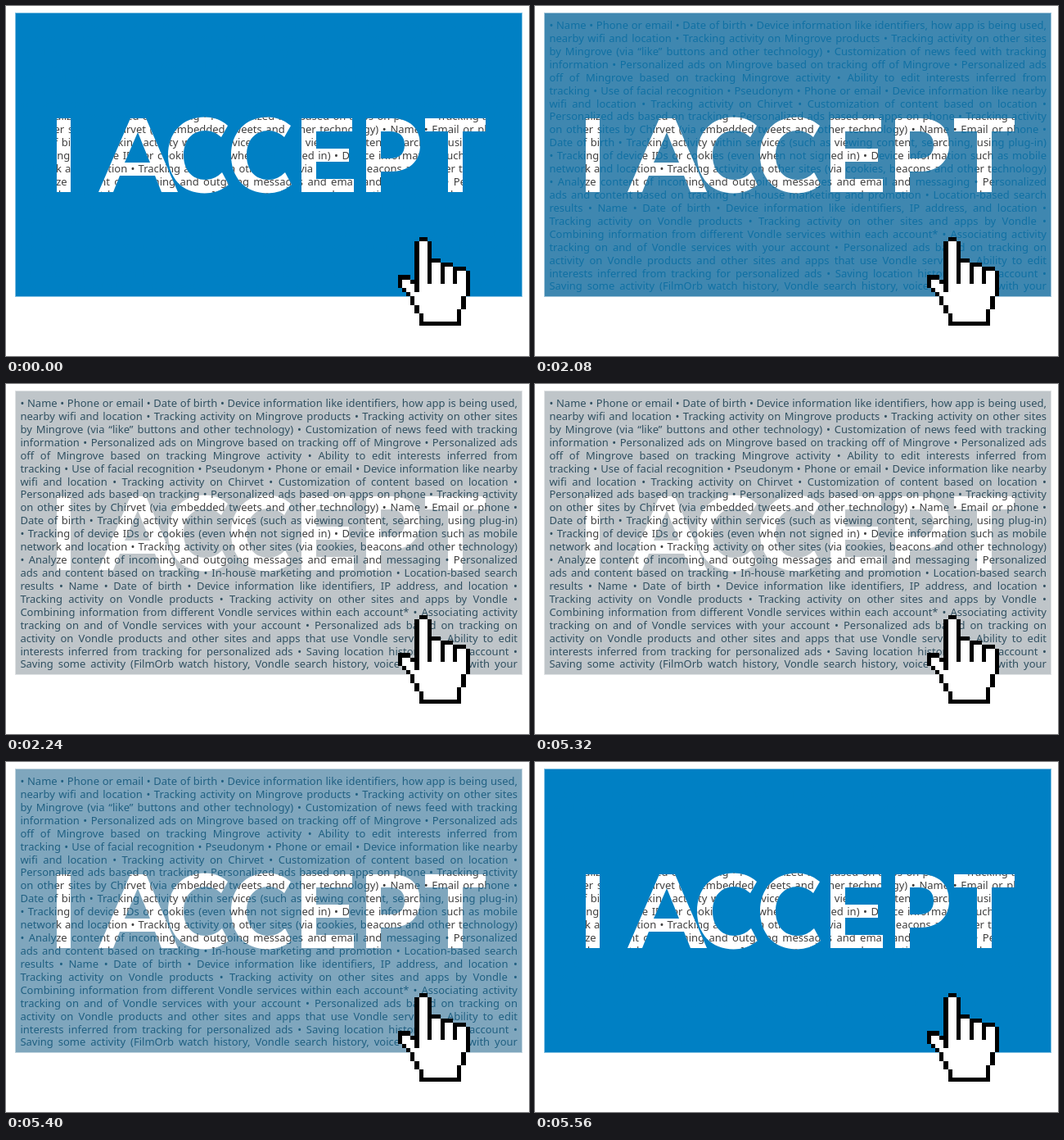
These frames come from a looping animation (639 px wide and 427 px high, 5.64 s). An HTML page:

```html
<!DOCTYPE html>
<html lang="en">
<head>
<meta charset="utf-8">
<title>I accept</title>
<style>
  html, body { margin: 0; width: 100%; height: 100%; overflow: hidden; background: #fff; }
  #panel, #letters, svg { position: absolute; }
  #panel { left: 11px; top: 8px; width: 620px; height: 347px; box-sizing: border-box; border: 1px solid; }
  #letters, svg { left: 0; top: 0; width: 639px; height: 427px; }
  #letters { background: #fff; }
  .terms {
    position: absolute; left: 17.4px; top: 16px; width: 607.6px;
    font: 13px/15.93px "Noto Sans", sans-serif; color: #404040;
  }
  .terms div { height: 15.93px; white-space: nowrap; text-align: justify; text-align-last: justify; }
</style>
</head>
<body>
<div id="panel"></div>
<div class="terms" id="terms"></div>
<div id="letters"><div class="terms" id="lettersTerms"></div></div>
<svg viewBox="0 0 639 427">
  <g id="hand">
    <path id="handFill" fill="#fff"/>
    <path id="handLine" fill="none" stroke="#000" stroke-linecap="square" shape-rendering="crispEdges"/>
  </g>
</svg>
<script>
const $ = id => document.getElementById(id);

const lines = `• Name • Phone or email • Date of birth • Device information like identifiers, how app is being used,
nearby wifi and location • Tracking activity on Mingrove products • Tracking activity on other sites
by Mingrove (via “like” buttons and other technology) • Customization of news feed with tracking
information • Personalized ads on Mingrove based on tracking off of Mingrove • Personalized ads
off of Mingrove based on tracking Mingrove activity • Ability to edit interests inferred from
tracking • Use of facial recognition • Pseudonym • Phone or email • Device information like nearby
wifi and location • Tracking activity on Chirvet • Customization of content based on location •
Personalized ads based on tracking • Personalized ads based on apps on phone • Tracking activity
on other sites by Chirvet (via embedded tweets and other technology) • Name • Email or phone •
Date of birth • Tracking activity within services (such as viewing content, searching, using plug-in)
• Tracking of device IDs or cookies (even when not signed in) • Device information such as mobile
network and location • Tracking activity on other sites (via cookies, beacons and other technology)
• Analyze content of incoming and outgoing messages and email and messaging • Personalized
ads and content based on tracking • In-house marketing and promotion • Location-based search
results • Name • Date of birth • Device information like identifiers, IP address, and location •
Tracking activity on Vondle products • Tracking activity on other sites and apps by Vondle •
Combining information from different Vondle services within each account* • Associating activity
tracking on and of Vondle services with your account • Personalized ads based on tracking on
activity on Vondle products and other sites and apps that use Vondle services • Ability to edit
interests inferred from tracking for personalized ads • Saving location history in your account •
Saving some activity (FilmOrb watch history, Vondle search history, voice commands) with your`;
$("terms").innerHTML = $("lettersTerms").innerHTML =
  lines.split("\n").map(line => `<div>${line}</div>`).join("");

// Cut-out letters: I A C C E P T
const letterC = x => `M${x} 146q-12-10.5-28-10.5c-28 0-45 19.5-45 46.5s17 46.5 45 46.5q16 0 29-10.5` +
  "l-8-15q-9 9-20 9c-17 0-27-12-27-30s10-30 27-30q10 0 19 8z";
const word = [
  "M62 137h17v90h-17z",
  "M152 137h19l39 90h-20l-8-20h-43l-8 20h-18zM161 154l-16 37h31z",
  letterC(271),
  letterC(348),
  "M361 137h62v16h-44v21h40v16h-40v21h46v16h-64z",
  "M440 137h31c22 0 35 12 35 32.5s-14 32.5-36 32.5h-12v25h-18z" +
    "M458 153v33h11c12 0 18-6 18-16.5s-6-16.5-18-16.5z",
  "M512 137h74v16h-28v74h-18v-74h-28z",
].join("");
$("letters").style.clipPath = `path(evenodd, "${word}")`;

// Pixel hand: runs of cells joined by L; the stroke lifts the pen between runs.
const outline = "M5 0h1L7 1v4L8 5h1L10 6h2L13 7h2L16 8v5L15 14v2L14 17v3h-9v-2" +
  "L4 17v-1L3 15v-1L2 13h0L1 12h0L0 11v-2h2L3 10h1V1";
$("handFill").setAttribute("d", outline);
$("handLine").setAttribute("d", outline.replaceAll("L", "M") + "M7 6v4M10 7v3M13 8v2M4 11v1");

const LOOP = 5640, STEP = 80;
const fills = ["#fff", "#bfc5c9", "#7fa6bd", "#3f87b0", "#0080c4"];

// Panel strength in quarters: 4 is solid, 0 is gone.
function levelAt(t) {
  if (t < 2320) return 4 - Math.max(0, Math.floor((t - 2000) / STEP));
  if (t < 5320) return 0;
  return 1 + Math.floor((t - 5320) / STEP);
}

function draw(now) {
  const t = now % LOOP;
  const level = levelAt(t);
  const pressed = t >= 2000 && t < 2000 + STEP;
  const panel = $("panel").style;
  panel.backgroundColor = fills[level];
  panel.borderColor = `color-mix(in srgb, ${fills[level]} 50%, #fff)`;
  $("terms").style.color = `color-mix(in srgb, #0080c4 ${level * 25}%, #404040)`;
  $("hand").setAttribute("transform", `translate(481.4 ${pressed ? 319.4 : 284.4}) scale(5.17)`);
  requestAnimationFrame(draw);
}
draw(0);
</script>
</body>
</html>
```
